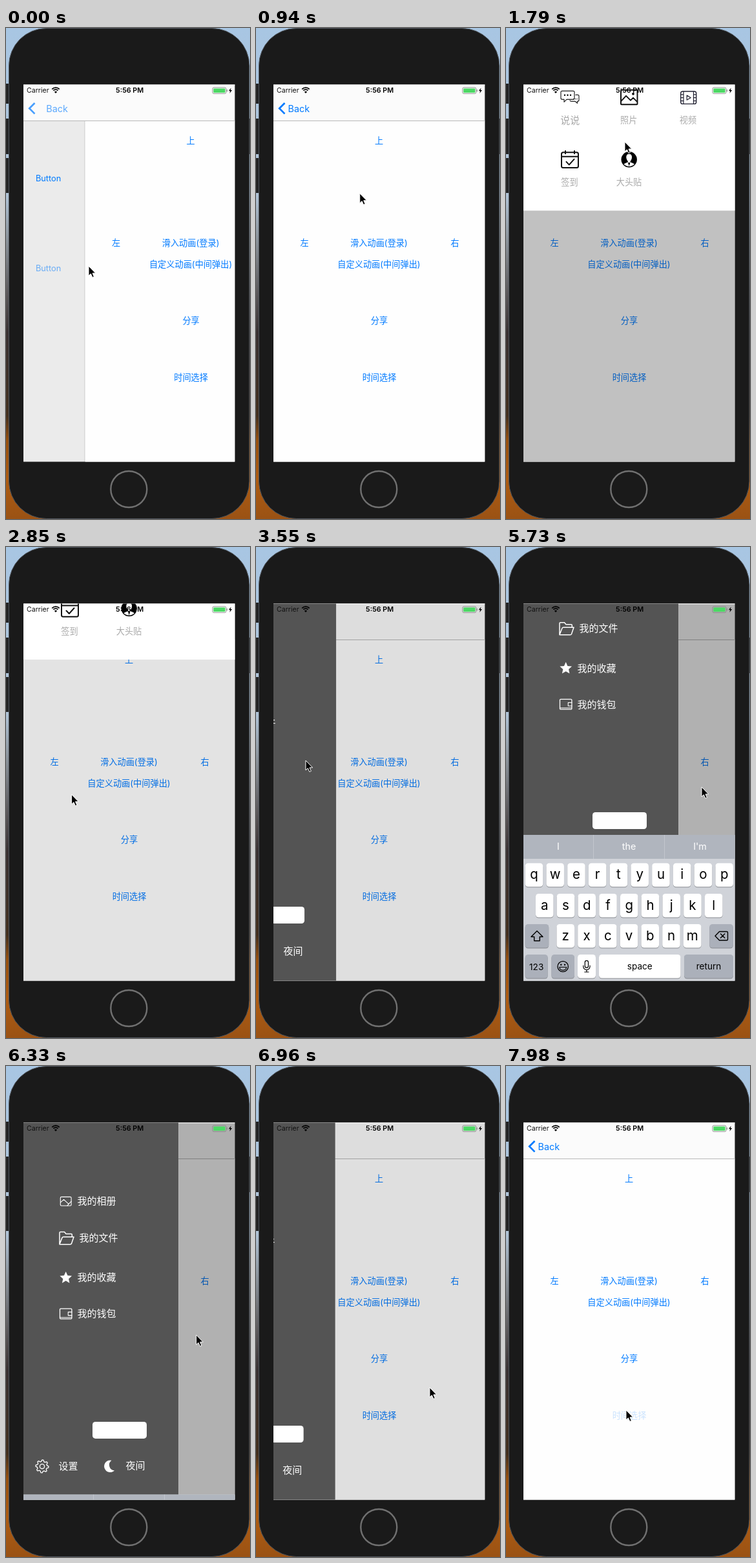
An HTML page for the animation above (8 s loop, 378 by 759 pixels).

```html
<!DOCTYPE html>
<html lang="zh">
<head>
<meta charset="utf-8">
<title>Popup demo</title>
<style>
  html, body { margin: 0; width: 100%; height: 100%; overflow: hidden; background: #1a1a1a; }
  svg { display: block; width: 100vw; height: 100vh; }
  text { font-family: Inter, "Noto Sans CJK SC", "Noto Sans CJK", sans-serif; }
  .line { fill: none; stroke-linejoin: round; stroke-linecap: round; }
</style>
</head>
<body>
<svg id="stage" viewBox="0 0 378 759" preserveAspectRatio="none"></svg>
<script>
const LOOP = 8000, SCREEN_W = 327.5;
const BLUE = '#007aff';

// Text centred vertically on y; Chinese glyphs sit lower on the baseline than Latin ones.
const label = (x, y, str, size, fill, anchor = 'middle', extra = '') => {
  const drop = /[\u4e00-\u9fff]/.test(str) ? 0.335 : 0.37;
  return `<text x="${x}" y="${y + size * drop}" font-size="${size}" fill="${fill}" text-anchor="${anchor}" ${extra}>${str}</text>`;
};
const box = (x, y, w, h, fill, rx = 0, extra = '') =>
  `<rect x="${x}" y="${y}" width="${w}" height="${h}" fill="${fill}" rx="${rx}" ${extra}/>`;
const line = (d, stroke, width = 1.3, extra = '') =>
  `<path class="line" d="${d}" stroke="${stroke}" stroke-width="${width}" ${extra}/>`;
const ring = (x, y, r, stroke, width) =>
  `<circle cx="${x}" cy="${y}" r="${r}" fill="none" stroke="${stroke}" stroke-width="${width}"/>`;

function polar(cx, cy, count, radius) {
  return Array.from({ length: count }, (_, i) => {
    const a = i * 2 * Math.PI / count - Math.PI / 2, r = radius(i);
    return `${(cx + r * Math.cos(a)).toFixed(2)} ${(cy + r * Math.sin(a)).toFixed(2)}`;
  }).join('L');
}

function backdrop() {
  const stops = [[0, '#a8c6e3'], [.34, '#b0c3d6'], [.43, '#8b939b'], [.54, '#5c595b'],
    [.62, '#3a3233'], [.79, '#43301f'], [.84, '#96500f'], [.92, '#ae5c12'], [1, '#9a5214']];
  return `<defs>
    <linearGradient id="sky" x2="0" y2="1">${stops.map(([o, c]) => `<stop offset="${o}" stop-color="${c}"/>`).join('')}</linearGradient>
    <clipPath id="screen">${box(27, 87.5, SCREEN_W, 583, '#fff')}</clipPath></defs>` +
    box(0, 0, 378, 759, 'url(#sky)') +
    box(-4, 86, 10, 31, '#242424', 2) + box(-4, 140, 10, 55, '#242424', 2) +
    box(-4, 201, 10, 54, '#242424', 2) + box(375, 140, 8, 55, '#242424', 2) +
    box(4.5, .5, 372.5, 758, '#1a1a1a', 58, 'stroke="#50565d"') +
    ring(190.3, 713, 28, '#707070', 2.4);
}

function home() {
  const items = [[190.5, 175, '上'], [75, 333, '左'], [190.5, 333, '滑入动画(登录)'], [308, 333, '右'],
    [190.5, 366, '自定义动画(中间弹出)'], [191, 452.5, '分享'], [191, 541, '时间选择']];
  return box(25.5, 144, 2, 527, '#000', 0, 'opacity=".08"') + box(27, 143, SCREEN_W + 1, 528, '#fefefe') +
    items.map(([x, y, s], i) =>
      label(x, y, s, 13.2, BLUE, 'middle', i === items.length - 1 ? 'id="timeItem"' : '')).join('');
}

function navBar() {
  return box(27, 87, SCREEN_W + 1, 56, '#fbfbfb') + box(27, 143, SCREEN_W + 1, 1, '#b8b8b8') +
    line('M44.5 116L36.2 124.3L44.5 132.6', BLUE, 2.7, 'id="chevron" style="stroke-linecap:butt;stroke-linejoin:miter"') +
    label(49.5, 124.5, 'Back', 14.4, BLUE, 'start', 'id="back"');
}

function statusBar() {
  const arc = r => line(`M${77 - r * .72} ${100.3 - r * .72}A${r} ${r} 0 0 1 ${77 + r * .72} ${100.3 - r * .72}`, '#000', 1.7, 'style="stroke-linecap:butt"');
  return label(32, 96.5, 'Carrier', 10.6, '#111', 'start') + arc(8) + arc(5) +
    '<path d="M77 101L74.9 98.8A3 3 0 0 1 79.1 98.8Z"/>' +
    label(191.7, 96.5, '5:56 PM', 10.8, '#000', 'middle', 'font-weight="600"') +
    box(320, 92, 21, 9.4, 'none', 2, 'stroke="#888" stroke-width=".9"') + box(321.4, 93.4, 18.2, 6.6, '#4cd964', 1) +
    box(341.8, 95, 1.2, 3.4, '#888', .5) + '<path d="M348.6 92.5L345 97.3H347.3L346.4 101L350.2 96H347.9Z"/>';
}

function topPanel() {
  const ink = '#222', grey = '#a9a9a9';
  const bubbles = line('M87 97H104Q106 97 106 99V108Q106 110 104 110H94L90 114V110H87Q85 110 85 108V99Q85 97 87 97ZM108 103H111Q113 103 113 105V111Q113 113 111 113H110.5V116L107 113H101Q99 113 99 111.5', ink, 1.2) +
    [91, 95.5, 100].map(x => `<circle cx="${x}" cy="103.5" r="1.2"/>`).join('') +
    [105, 107.5, 110].map(x => `<circle cx="${x}" cy="109.5" r=".7"/>`).join('');
  const photo = box(178, 95.5, 25.5, 22.5, 'none', 1, 'stroke="#111" stroke-width="2"') +
    line('M178 113L186 104.5L193 111.5L197 107.5L203 113.5', '#111', 1.9) + '<circle cx="197" cy="101.5" r="1.9"/>';
  const video = box(270.7, 97.7, 24, 19.4, 'none', 3, 'stroke="#223" stroke-width="1.4"') +
    line('M275 98V117M290.5 98V117M271 102.5H275M271 107.4H275M271 112.3H275M290.5 102.5H294.5M290.5 107.4H294.5M290.5 112.3H294.5M280.2 103.8V111L286.2 107.4Z', '#223', 1.2);
  const calendar = box(86, 192, 26, 23.8, 'none', 2.5, 'stroke="#111" stroke-width="2"') +
    line('M86 198.5H112M92 189.7V194M106 189.7V194M93.5 206.5L97.8 211L105.5 202.5', '#111', 2);
  const avatar = '<circle cx="190.7" cy="203" r="12.2"/><path fill="#fff" d="M190.7 194.5C194.6 194.5 195.6 198 194.8 201.5Q194 204.6 192.6 205.6V207.3Q197.5 208.5 198.8 210.5Q195.5 213.6 190.7 213.6T182.6 210.5Q184 208.5 188.8 207.3V205.6Q187.4 204.6 186.6 201.5C185.8 198 186.8 194.5 190.7 194.5Z"/><path d="M189 207.8L190.7 213.5L192.4 207.8Z"/>';
  return box(27, -200, SCREEN_W + 1, 481.5, '#fff') +
    `<g transform="translate(0 -.5)">${bubbles + photo + video + calendar + avatar}</g>` +
    label(99.3, 142, '说说', 15, grey) + label(190.3, 142, '照片', 13.2, grey) + label(282, 142, '视频', 13.2, grey) +
    label(98.5, 238, '签到', 13.2, grey) + label(190.5, 238, '大头贴', 13.2, grey);
}

function drawer() {
  const W = '#fff', t = (x, y, s) => label(x, y, s, 15, W, 'start');
  const photo = box(84.3, 208.5, 16.8, 13.6, 'none', 1.5, 'stroke="#fff" stroke-width="1.1"') +
    line('M84.5 217L89.5 212.5L97 219.5L101 215.5M95 222L98.5 218', W, 1.1);
  const folder = line('M83 281.5V264Q83 262.7 84.3 262.7H90.5L93 265.7H101Q102.3 265.7 102.3 267V270.3M83 281.5L87 271.5Q87.5 270.3 88.8 270.3H105L101.5 280.5Q101 281.8 99.7 281.8H83Z', W, 1.5);
  const star = `<path fill="#fff" d="M${polar(92.7, 333.6, 10, i => i % 2 ? 4.6 : 9.8)}Z"/>`;
  const wallet = box(83.5, 381.3, 18.4, 15.6, 'none', 1.2, 'stroke="#fff" stroke-width="1.3"') +
    line('M102 386.5H96.3V391.7H102M83.5 394.8H101.5', W, 1.1);
  const gear = line(`M${polar(56, 625, 32, i => i % 4 < 2 ? 10 : 7.6)}Z`, W, 1.3) + ring(56, 625, 3.6, W, 1.3);
  const moon = '<path fill="#fff" d="M163.5 615.8A9.3 9.3 0 1 0 168 631.4A8.6 8.6 0 0 1 163.5 615.8Z"/>';
  return box(27, 87, 240, 584, '#545454') + photo + folder + star + wallet + gear + moon +
    t(110.5, 215.5, '我的相册') + t(113.5, 272, '我的文件') + t(110.5, 333.5, '我的收藏') + t(110.5, 389.5, '我的钱包') +
    t(81.5, 625.5, '设置') + t(185.5, 624.5, '夜间') + box(134, 556, 84, 26, '#fff', 4.5);
}

function keyboard() {
  const PITCH = 32.75, KEY = 27.5, ROW = 36.5, GREY = '#abb0ba';
  const key = (x, y, w, fill = '#fff') => box(x, y + 1, w, ROW, '#898c91', 4.5) + box(x, y, w, ROW, fill, 4.5);
  const rows = [['qwertyuiop', 29.7, 488.7], ['asdfghjkl', 46, 536], ['zxcvbnm', 78.5, 583]];
  const letters = rows.map(([chars, x0, y]) => [...chars].map((c, i) =>
    key(x0 + i * PITCH, y, KEY) + label(x0 + i * PITCH + KEY / 2, y + 17, c, 20.5, '#000')).join('')).join('');
  const hints = [[81, 'I'], [190.5, 'the'], [300.5, "I'm"]].map(([x, s]) => label(x, 462.5, s, 14.3, '#fff')).join('');
  const shift = line('M48 593.5L57 602.5H52.3V608.8H43.7V602.5H39Z', '#000', 1.4);
  const erase = line('M330.5 594.5H342Q343.5 594.5 343.5 596V606.5Q343.5 608 342 608H330.5L324 601.2ZM332.5 598L338.8 604.3M338.8 598L332.5 604.3', '#000', 1.4);
  const smile = ring(88.2, 648.5, 8.2, '#000', 1.3) + '<circle cx="85.3" cy="645.8" r="1.2"/><circle cx="91.1" cy="645.8" r="1.2"/>' +
    line('M82.8 649.5H93.6Q92.8 654.3 88.2 654.3T82.8 649.5Z', '#000', 1.2);
  const mic = box(122.3, 639.3, 5.2, 11, 'none', 2.6, 'stroke="#000" stroke-width="1.2"') +
    line('M119.8 647V648.5A5.1 5.1 0 0 0 130 648.5V647M124.9 653.6V657M121.8 657H128', '#000', 1.2);
  return box(27, 445, SCREEN_W + 1, 227, '#d0d3d9') + box(27, 445, SCREEN_W + 1, 37, '#b0b5be') +
    box(135, 445, 1, 37, '#c2c6cd') + box(245, 445, 1, 37, '#c2c6cd') + hints + letters +
    key(29.7, 583, 36.5, GREY) + shift + key(315.3, 583, 36.5, GREY) + erase +
    key(29.7, 630, 35, GREY) + label(47.2, 648.5, '123', 13.6, '#000') +
    key(70.5, 630, 35.5, GREY) + smile + key(111, 630, 28, '#fff') + mic +
    key(144, 630, 126.5) + label(207.3, 647.5, 'space', 13.6, '#000') +
    key(276, 630, 76, GREY) + label(314, 647.5, 'return', 13.6, '#000');
}

const under = box(27, 143, SCREEN_W, 528, '#ebebeb') +
  `<g id="under">${label(135, 232, 'Button', 12.8, BLUE)}${label(135, 371, 'Button', 12.8, BLUE, 'middle', 'opacity=".55"')}</g>`;

document.getElementById('stage').innerHTML = backdrop() +
  `<g clip-path="url(#screen)">${under}
    <g id="home">${home()}</g>${navBar()}
    ${box(27, 87, SCREEN_W + 1, 584, '#000', 0, 'id="mask"')}
    <g id="panel">${topPanel()}</g><g id="drawer">${drawer()}</g>
    ${statusBar()}<g id="keys">${keyboard()}</g></g>
  <path id="cursor" d="M0 0V15L3.4 11.9L5.9 17.5L8.4 16.4L6 11H10.7Z" fill="#000" stroke="#fff" stroke-width="1"/>`;

const el = Object.fromEntries([...document.querySelectorAll('#stage [id]')].map(n => [n.id, n]));
const move = (node, x, y) => node.setAttribute('transform', `translate(${x.toFixed(2)} ${y.toFixed(2)})`);
const fade = (node, value) => node.setAttribute('opacity', Math.max(0, Math.min(1, value)).toFixed(3));

const smooth = x => (x = Math.max(0, Math.min(1, x)), x * x * (3 - 2 * x));
const ease = (t, start, ms = 250) => smooth((t - start) / ms);
// Critically damped system curve for pushes and the keyboard.
const settle = (t, start) => {
  const x = Math.max(0, t - start) * 0.0183;
  return 1 - (1 + x) * Math.exp(-x);
};
// Underdamped spring: ratio 0.6, settling in 750 ms.
const bounce = (t, start) => {
  const s = Math.max(0, t - start) / 1000;
  return 1 - Math.exp(-9.2 * s) * (Math.cos(12.3 * s) + 0.75 * Math.sin(12.3 * s));
};

// Pointer stops: time, x, y.
const path = [
  [0, 128, 368], [50, 128, 368], [1650, 184, 176], [1800, 184, 176], [2370, 105, 390], [2720, 105, 390],
  [3320, 77, 330], [3690, 77, 330], [4290, 176, 531], [4520, 177, 564], [5100, 177, 564], [5730, 303, 371],
  [6120, 303, 371], [6610, 282, 484], [6850, 282, 484], [6960, 269, 497], [7200, 185, 532], [7979, 185, 532], [7980, 186, 532], [LOOP, 186, 532]
];
function pointer(t) {
  const i = path.findIndex(p => p[0] > t), [t0, x0, y0] = path[i - 1], [t1, x1, y1] = path[i];
  const k = smooth((t - t0) / (t1 - t0));
  return [x0 + (x1 - x0) * k, y0 + (y1 - y0) * k];
}

function render(t) {
  const left = 1 - settle(t, -134.4);
  move(el.home, SCREEN_W * left, 0);
  move(el.under, -98 * (1 - left), 0);
  move(el.back, 44 * left, 0);
  fade(el.back, 1 - 1.25 * left);
  fade(el.chevron, 1 - left);

  const panel = bounce(t, 1660.5) * (1 - ease(t, 2700));
  const side = ease(t, 3442) * (1 - ease(t, 6819));
  const keys = settle(t, 4900) - settle(t, 6060);
  move(el.panel, 0, 247 * panel - 193);
  move(el.drawer, 240 * (side - 1), -146 * keys);
  move(el.keys, 0, 227 * (1 - keys));
  fade(el.mask, 0.305 * Math.min(1, panel + side));
  fade(el.timeItem, t >= 7800 ? 0.2 : 1);
  move(el.cursor, ...pointer(t));
}

const start = performance.now();
(function tick() {
  render((performance.now() - start) % LOOP);
  requestAnimationFrame(tick);
})();
</script>
</body>
</html>
```
